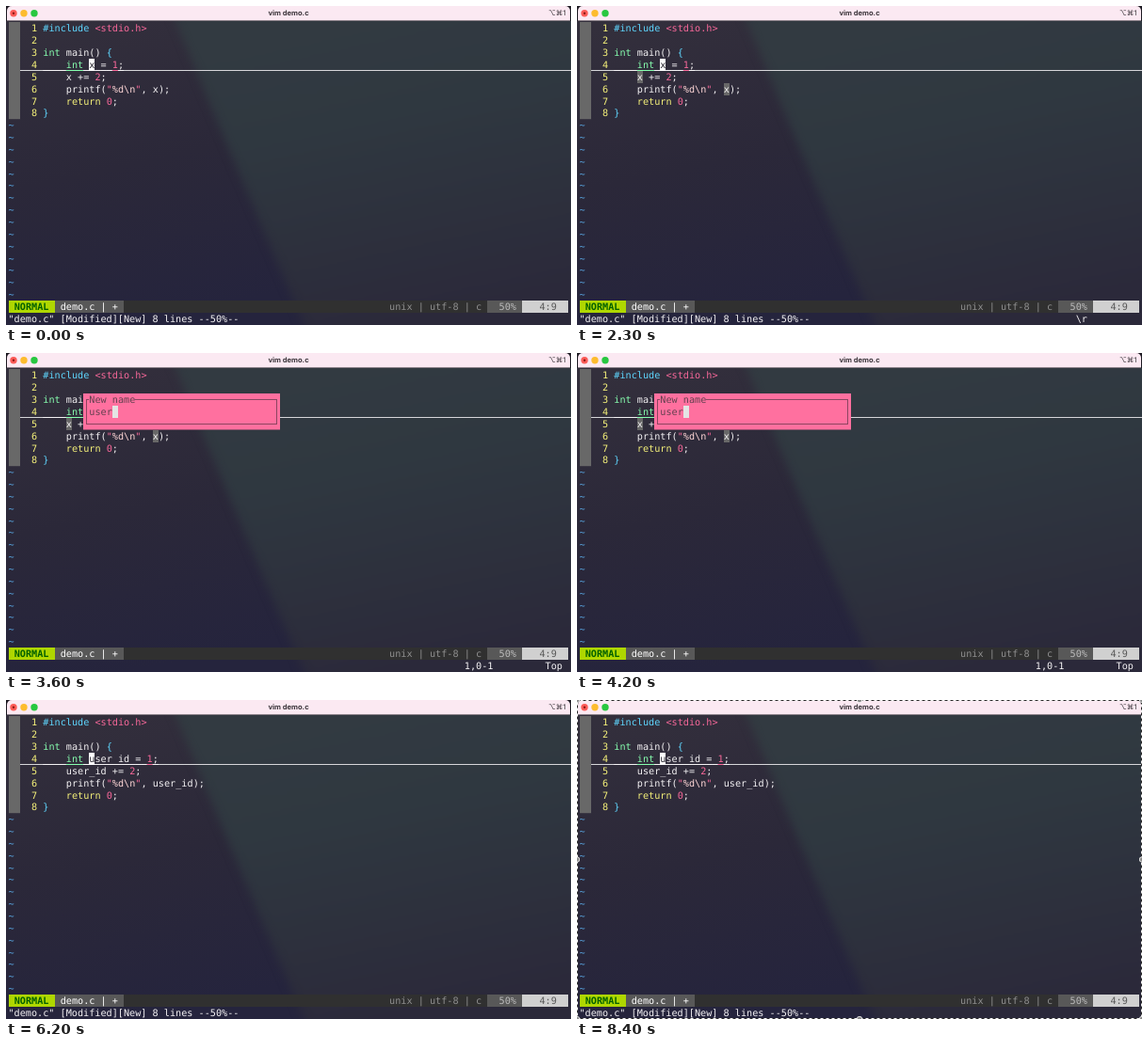
Recreate the animation shown at these times as an HTML page with a canvas. Size 600 by 339 pixels, loop 9100 ms.

```html
<!DOCTYPE html>
<html lang="en">
<head>
<meta charset="utf-8">
<title>vim demo.c</title>
<style>
html, body { margin: 0; width: 100%; height: 100%; overflow: hidden; background: #2b2a3a; }
canvas { display: block; width: 600px; height: 339px; }
</style>
</head>
<body>
<canvas id="stage"></canvas>
<script>
const W = 600, H = 339, LOOP = 9100;
const X0 = 2.5, Y0 = 17.4, CW = 6.13, CH = 12.85;
const MONO = '"DejaVu Sans Mono", monospace';
const FONT = '10.18px ' + MONO;

const canvas = document.getElementById('stage');
const ctx = canvas.getContext('2d');
const dpr = window.devicePixelRatio || 1;
canvas.width = W * dpr;
canvas.height = H * dpr;
ctx.scale(dpr, dpr);
ctx.textRendering = 'geometricPrecision';

const colX = c => X0 + c * CW;
const rowY = r => Y0 + r * CH;

function rect(x, y, w, h, color) {
  ctx.fillStyle = color;
  ctx.fillRect(x, y, w, h);
}

function cells(col, row, n, color) {
  const x = Math.round(colX(col)), y = Math.round(rowY(row));
  rect(x, y, Math.round(colX(col + n)) - x, Math.round(rowY(row + 1)) - y, color);
}

function text(col, row, str, color, font = FONT) {
  ctx.font = font;
  ctx.fillStyle = color;
  ctx.fillText(str, colX(col), rowY(row) + 10);
}

function dot(x, y, r, color) {
  ctx.fillStyle = color;
  ctx.beginPath();
  ctx.arc(x, y, r, 0, 7);
  ctx.fill();
}

function blend(x0, y0, x1, y1, colors) {
  const g = ctx.createLinearGradient(x0, y0, x1, y1);
  colors.forEach((c, i) => g.addColorStop(i / (colors.length - 1), c));
  return g;
}

function backdrop() {
  rect(0, 0, W, H, blend(60, 15, 130, H, ['#332f3c', '#2b2839', '#25243d']));
  ctx.fillStyle = blend(330, 15, 400, H, ['#323a41', '#2f3840', '#2d313d', '#2b293a']);
  ctx.save();
  ctx.filter = 'blur(5px)';
  ctx.beginPath();
  ctx.moveTo(165, -20);
  ctx.quadraticCurveTo(235, 150, 325, H + 20);
  ctx.lineTo(W + 20, H + 20);
  ctx.lineTo(W + 20, -20);
  ctx.fill();
  ctx.restore();
}

function titleBar() {
  rect(0, 0, W, 16, '#1d1a22');
  ctx.fillStyle = '#fbe9f2';
  ctx.beginPath();
  ctx.roundRect(1, 0, W - 2, 15.5, [5, 5, 0, 0]);
  ctx.fill();
  dot(8, 7.8, 3.7, '#fc5b57');
  dot(8, 7.8, 1.2, '#8c1a17');
  dot(19, 7.8, 3.7, '#fdbc2e');
  dot(30, 7.8, 3.7, '#28c840');
  ctx.fillStyle = '#3a343a';
  ctx.textAlign = 'center';
  ctx.font = 'bold 7.6px Inter, sans-serif';
  ctx.fillText('vim demo.c', 300, 10.4);
  ctx.textAlign = 'right';
  ctx.font = '7.6px Inter, "DejaVu Sans", sans-serif';
  ctx.fillText('⌥⌘1', 594.5, 10.4);
  ctx.textAlign = 'left';
}

const SYNTAX = [
  [/^(#include|[{}])/, '#5fd7ff'],
  [/^(<[^>]+>|"|\d+)/, '#f8689a'],
  [/^(%d|\\n)/, '#ffd7d7'],
  [/^int\b/, '#87ffaf'],
  [/^return\b/, '#f6f27a'],
  [/^(\w+|\s+|.)/, '#f4f2f4']
];

function codeLine(row, src, underline) {
  let col = 6;
  while (src) {
    const [re, color] = SYNTAX.find(([re]) => re.test(src));
    const tok = src.match(re)[0];
    text(col, row, tok, color);
    if (underline) rect(colX(col), 68, tok.length * CW, 1, color);
    col += tok.length;
    src = src.slice(tok.length);
  }
}

function editor(name, marked, prompt) {
  rect(3, 17, 12, rowY(8) - 17, '#686868');
  rect(15, 68, W - 15, 1, '#d6d6da');
  if (marked) {
    cells(10, 4, 1, '#686868');
    cells(25, 5, 1, '#686868');
  }
  [
    '#include <stdio.h>', '', 'int main() {',
    `    int ${name} = 1;`, `    ${name} += 2;`,
    `    printf("%d\\n", ${name});`, '    return 0;', '}'
  ].forEach((src, row) => {
    text(4, row, String(row + 1), '#f6f27a');
    codeLine(row, src, row === 3);
  });
  for (let r = 8; r < 23; r++) text(0, r, '~', '#5aa9e6');
  if (!prompt) {
    cells(14, 3, 1, '#ffffff');
    text(14, 3, name[0], '#25232c');
  }
}

function popup(typed) {
  cells(13, 2, 34, '#ff709f');
  rect(82, 43, 209, 38.5, '#ff709f');
  ctx.strokeStyle = '#8c4560';
  ctx.lineWidth = 1;
  ctx.strokeRect(85.5, 49.5, 202, 26);
  cells(14, 2, 8, '#ff709f');
  text(14, 2, 'New name', '#63404f');
  text(14, 3, typed, '#63404f');
  cells(14 + typed.length, 3, 1, '#e4e4e4');
}

function statusLine() {
  cells(0, 23, 97, '#303030');
  cells(0, 23, 8, '#afd700');
  text(1, 23, 'NORMAL', '#005f00', 'bold ' + FONT);
  cells(8, 23, 12, '#585858');
  text(9, 23, 'demo.c | +', '#ffffff');
  text(66, 23, 'unix | utf-8 | c', '#8f8f8f');
  cells(83, 23, 6, '#585858');
  text(85, 23, '50%', '#bcbcbc');
  cells(89, 23, 8, '#d0d0d0');
  text(92, 23, '4:9', '#585858');
}

function selection() {
  ctx.lineWidth = 1;
  ctx.strokeStyle = '#f4f4f4';
  ctx.strokeRect(0.5, 0.5, W - 1, H - 1);
  ctx.strokeStyle = '#2a2a2a';
  ctx.setLineDash([3, 3]);
  ctx.strokeRect(0.5, 0.5, W - 1, H - 1);
  ctx.setLineDash([]);
  for (const x of [0, W / 2, W]) {
    for (const y of [0, H / 2, H]) {
      if (x === W / 2 && y === H / 2) continue;
      dot(x, y, 3, '#f0f0f0');
      dot(x, y, 2.2, '#8a8a8a');
    }
  }
}

const KEYS = [3300, 3300, 3400, 3600, 4300, 4700, 4800];

function draw(t) {
  const prompt = t >= 2500 && t < 5500;
  const renamed = t >= 5500;
  backdrop();
  titleBar();
  editor(renamed ? 'user_id' : 'x', t >= 100 && !renamed, prompt);
  statusLine();
  if (prompt) {
    popup('user_id'.slice(0, KEYS.filter(k => t >= k).length));
    text(79, 24, '1,0-1', '#f4f2f4');
    text(93, 24, 'Top', '#f4f2f4');
  } else {
    text(0, 24, '"demo.c" [Modified][New] 8 lines --50%--', '#f4f2f4');
    if (t >= 1900 && t < 2500) text(86, 24, t < 2300 ? '\\' : '\\r', '#f4f2f4');
  }
  if (t >= 8000) selection();
}

const start = performance.now();
function tick() {
  draw((performance.now() - start) % LOOP);
  requestAnimationFrame(tick);
}
tick();
</script>
</body>
</html>
```
